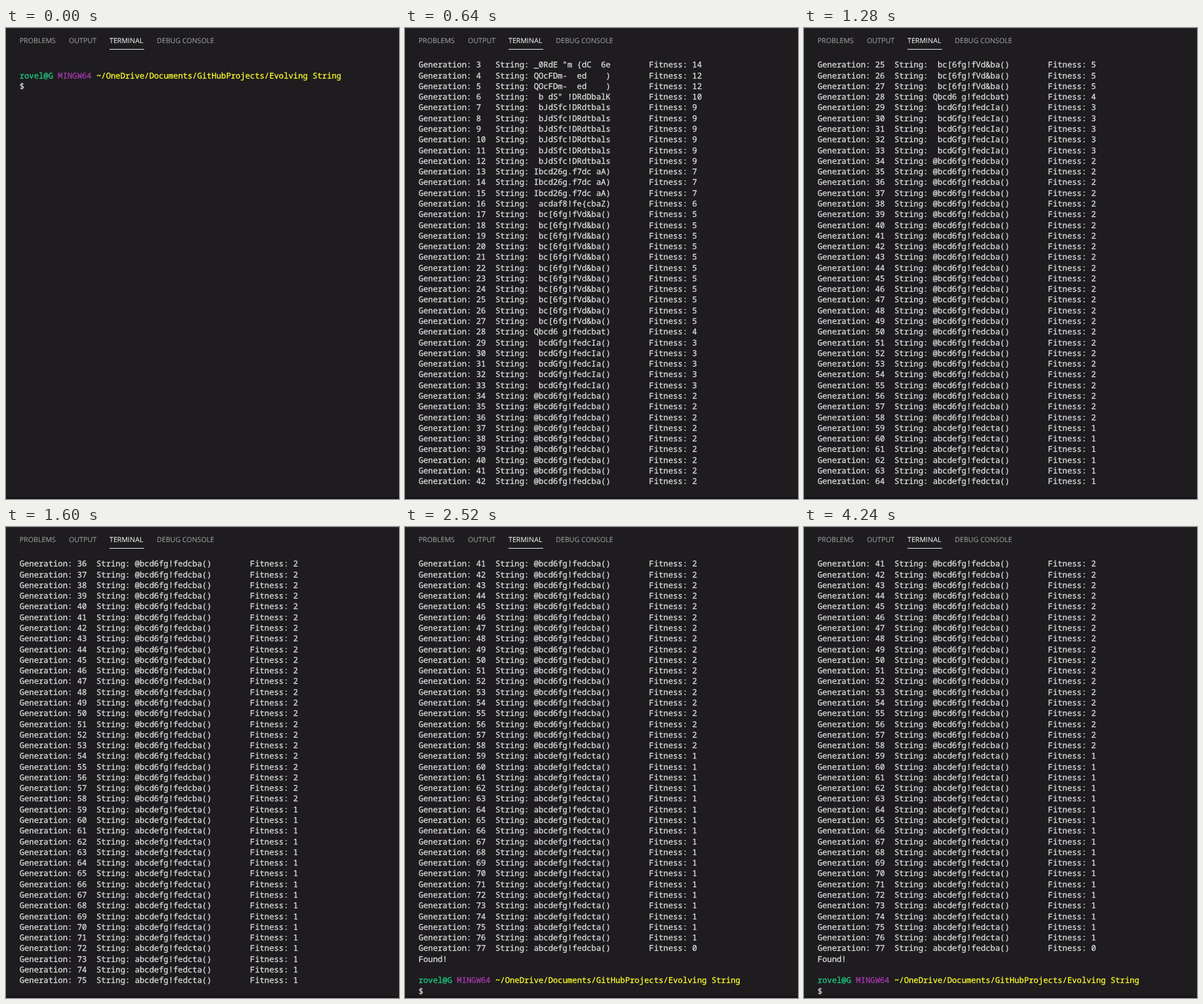
Write an HTML page that moves like this. It is 600 px wide and 718 px high and loops after 4.28 s.

```html
<!DOCTYPE html>
<html lang="en">
<head>
<meta charset="utf-8">
<title>Terminal</title>
<style>
  html, body { margin: 0; width: 100%; height: 100%; overflow: hidden; background: #1e1c1f; }
  svg { display: block; width: 600px; height: 718px; }
  text { white-space: pre; text-rendering: geometricPrecision; stroke: currentColor; fill: currentColor; }
  .tab { font: 10.7px "Open Sans", "Noto Sans", sans-serif; color: #9c9c9c; stroke-width: .1; }
  .active { color: #f0f0f0; }
  .row { font: 12.225px "Noto Sans Mono", "DejaVu Sans Mono", monospace; font-variant-ligatures: none; color: #e0e0e0; stroke-width: .28; }
  tspan { fill: currentColor; stroke: currentColor; }
  .user { color: #1fcf88; }
  .host { color: #a838ae; }
  .path { color: #ffff2c; }
</style>
</head>
<body>
<svg viewBox="0 0 600 718">
  <rect width="600" height="718" fill="#1e1c1f"/>
  <rect width="600" height="1" fill="#2b2c35"/>
  <rect y="715" width="600" height="3" fill="#18121a"/>
  <text class="tab" x="20.7" y="22.7">PROBLEMS</text>
  <text class="tab" x="96" y="22.7">OUTPUT</text>
  <text class="tab active" x="158" y="22.7">TERMINAL</text>
  <text class="tab" x="230.2" y="22.7">DEBUG CONSOLE</text>
  <rect x="158" y="32" width="53" height="1" fill="#e7e7e7"/>
  <g id="screen"></g>
</svg>
<script>
const NS = 'http://www.w3.org/2000/svg';
const LOOP = 4280, STEP = 40, ROWS = 41, LEFT = 20.7, BASE = 60.3, PITCH = 16.28;
const COMMAND_AT = 40, FOUND_AT = 1665, PROMPT_AT = 1720;

// Best candidate: first generation, string, fitness
const BEST = [
  [1, '_0RdE "m {dC  6e', 14],
  [4, 'QOcFDm-  ed    )', 12],
  [6, ' b dS" !DRdDbalK', 10],
  [7, ' bJdSfc!DRdtbals', 9],
  [13, 'Ibcd26g.f7dc aA)', 7],
  [16, ' acdaf8!fe{cbaZ)', 6],
  [17, ' bc[6fg!fVd&ba()', 5],
  [28, 'Qbcd6 g!fedcbat)', 4],
  [29, ' bcdGfg!fedcIa()', 3],
  [34, '@bcd6fg!fedcba()', 2],
  [59, 'abcdefg!fedcta()', 1],
  [77, 'abcdefg!fedcba()', 0]
];

// Printing slows down once the screen has to scroll: [ms, generation]
const PACE = [[160, 0], [400, 23], [560, 40], [960, 54], [1600, 75], [1660, 77]];

const plain = s => [['', s]];
const PROMPT = [
  ['user', 'rovel@G '],
  ['host', 'MINGW64 '],
  ['path', '~/OneDrive/Documents/GitHubProjects/Evolving String']
];
const COMMAND = '$ C:/Users/rovel/AppData/Local/Programs/Python/Python38-32/python.exe "c:/Users/rovel/';

function generation(n) {
  const [, text, fitness] = BEST.filter(b => b[0] <= n).pop();
  return plain(`Generation: ${String(n).padEnd(4)}String: ${text}        Fitness: ${fitness}`);
}

function printed(t) {
  if (t < PACE[0][0]) return 0;
  for (let i = 1; i < PACE.length; i++) {
    const [t0, n0] = PACE[i - 1], [t1, n1] = PACE[i];
    if (t < t1) return Math.floor(n0 + (n1 - n0) * (t - t0) / (t1 - t0));
  }
  return 77;
}

function output(t) {
  const lines = [plain(''), PROMPT];
  if (t < COMMAND_AT) return [...lines, plain('$')];
  lines.push(plain(COMMAND));
  const count = printed(t);
  for (let n = 1; n <= count; n++) lines.push(generation(n));
  if (t >= FOUND_AT) lines.push(plain('Found!'));
  if (t >= PROMPT_AT) lines.push(plain(''), PROMPT, plain('$'));
  else lines.push(plain(''));
  return lines;
}

const rows = Array.from({ length: ROWS }, (_, i) => {
  const row = document.createElementNS(NS, 'text');
  row.setAttribute('class', 'row');
  row.setAttribute('x', LEFT);
  row.setAttribute('y', BASE + i * PITCH);
  document.getElementById('screen').append(row);
  return row;
});

function span([cls, text]) {
  const s = document.createElementNS(NS, 'tspan');
  if (cls) s.setAttribute('class', cls);
  s.textContent = text;
  return s;
}

let shown = -1;
function draw(time) {
  const t = Math.floor((time % LOOP) / STEP) * STEP;
  if (t === shown) return;
  shown = t;
  const view = output(t).slice(-ROWS);
  rows.forEach((row, i) => row.replaceChildren(...(view[i] || []).map(span)));
}

const start = performance.now();
function tick() {
  draw(performance.now() - start);
  requestAnimationFrame(tick);
}
tick();
</script>
</body>
</html>
```
